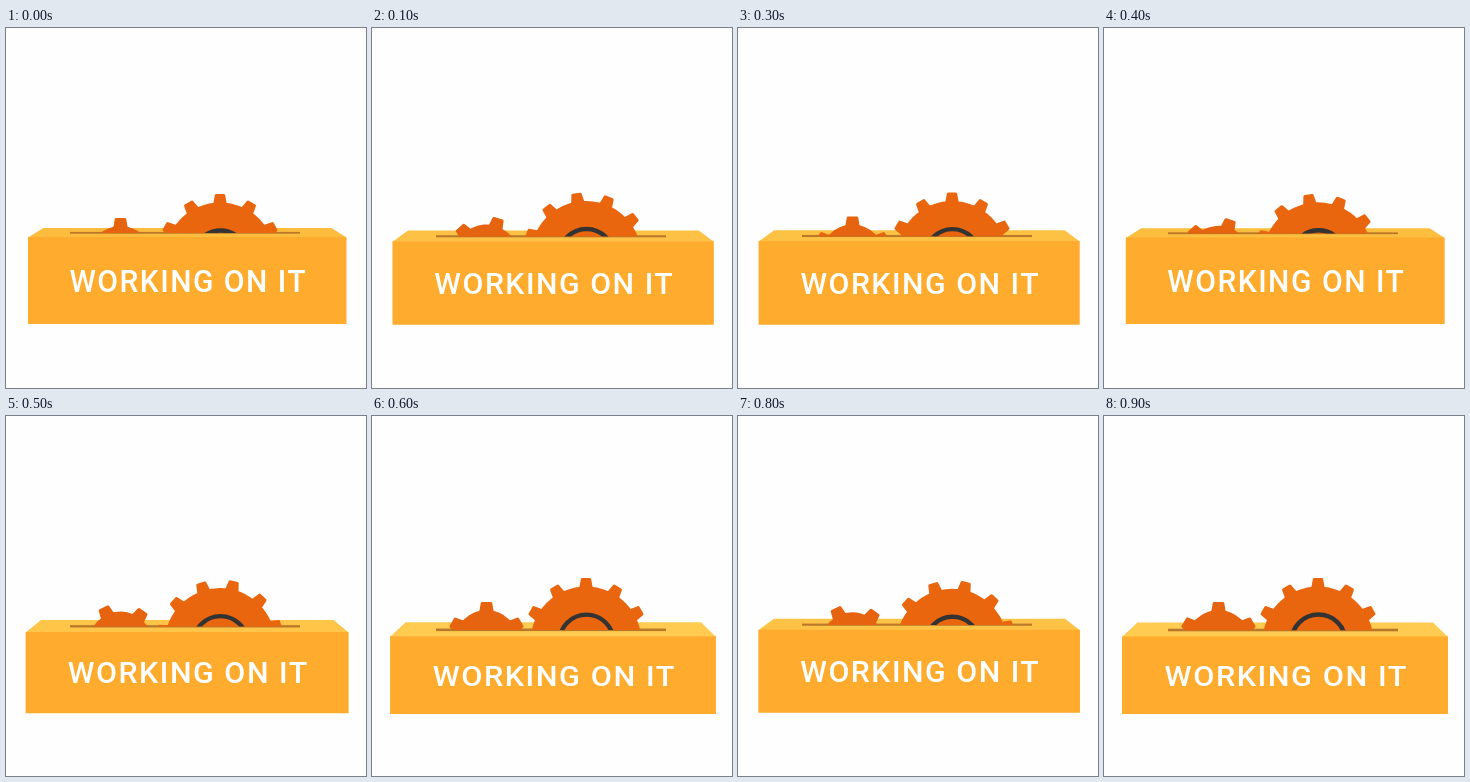
These frames come from a looping animation (360 px wide and 360 px high, 1000 ms). An HTML page with a canvas:

```html
<!DOCTYPE html>
<html lang="en">
<head>
<meta charset="utf-8">
<title>Working on it</title>
<style>
  html, body { margin: 0; width: 100%; height: 100%; overflow: hidden; background: #fefefe; }
  canvas { display: block; width: 360px; height: 360px; }
</style>
</head>
<body>
<canvas id="stage"></canvas>
<script>
const SIZE = 360, LOOP = 1000, STEP = 100;
const canvas = document.getElementById('stage');
const ctx = canvas.getContext('2d');
const ratio = window.devicePixelRatio || 1;
canvas.width = canvas.height = SIZE * ratio;

// How far the box is squashed at each step: 0 tall, 1 flat
const squash = [0, 0.38, 1, 0.35, 0.05, 0.6, 0.98, 0.1, 0.42, 1];

const mix = (a, b, k) => a + (b - a) * k;

function polygon(points, color) {
  ctx.beginPath();
  points.forEach(([x, y]) => ctx.lineTo(x, y));
  ctx.closePath();
  ctx.fillStyle = color;
  ctx.fill();
}

function gear(x, y, { teeth, body, tip, tipHalf, baseHalf, color }, angle) {
  const round = 1.5;
  ctx.save();
  ctx.translate(x, y);
  ctx.rotate(angle * Math.PI / 180);
  ctx.strokeStyle = color;
  ctx.lineWidth = round * 2;
  ctx.lineJoin = 'round';
  for (let i = 0; i < teeth; i++) {
    polygon([
      [-baseHalf + round, -body + 3],
      [-tipHalf + round, -tip + round],
      [tipHalf - round, -tip + round],
      [baseHalf - round, -body + 3]
    ], color);
    ctx.stroke();
    ctx.rotate(2 * Math.PI / teeth);
  }
  ctx.beginPath();
  ctx.arc(0, 0, body, 0, 2 * Math.PI);
  ctx.fill();
  ctx.restore();
}

const bigGear = { teeth: 12, body: 55.5, tip: 64, tipHalf: 5.2, baseHalf: 7, color: '#e9660f' };
const smallGear = { teeth: 6, body: 32, tip: 40, tipHalf: 5.8, baseHalf: 7.4, color: '#e6630f' };

function drawBox(k, slotY) {
  const left = mix(22, 18, k), right = mix(340.5, 344, k);
  const top = mix(209, 220.5, k), bottom = mix(296, 298, k);
  const back = mix(200, 206.5, k);
  const lid = `rgb(${mix(252, 255, k)}, ${mix(189, 203, k)}, ${mix(62, 80, k)})`;

  polygon([[left, top + 0.5], [left + 15.5, back], [right - 15, back], [right, top + 0.5]], lid);
  polygon([[left, top], [right, top], [right, bottom], [left, bottom]], '#ffab2d');

  const slot = mix(1.8, 2.6, k);
  ctx.fillStyle = '#b9782a';
  ctx.fillRect(64, slotY - slot / 2, 230, slot);

  const size = 30, spacing = 1.5;
  ctx.save();
  ctx.translate(181.5, (top + bottom) / 2 + 0.5);
  ctx.scale((right - left) / 318.5, (bottom - top) / 87 * 1.04);
  ctx.font = `500 ${size}px Roboto, sans-serif`;
  ctx.letterSpacing = spacing + 'px';
  ctx.textAlign = 'center';
  ctx.fillStyle = '#fff';
  ctx.fillText('WORKING ON IT', spacing / 2, size * 0.711 / 2);
  ctx.restore();
}

function drawGears(k, turn, slotY) {
  const y = mix(230, 226, k);
  ctx.save();
  ctx.beginPath();
  ctx.rect(0, 0, SIZE, slotY + 0.3);
  ctx.clip();
  gear(114.5, y, smallGear, 60 * turn);
  gear(214, y, bigGear, -30 * turn);
  ctx.beginPath();
  ctx.arc(214.5, y - 0.5, 27, 0, 2 * Math.PI);
  ctx.strokeStyle = '#333';
  ctx.lineWidth = 4.4;
  ctx.stroke();
  ctx.restore();
}

function draw(now) {
  const step = Math.floor((now % LOOP) / STEP);
  const k = squash[step];
  const turn = 0.29 * (step % 3);
  const slotY = mix(204.8, 214, k);

  ctx.setTransform(ratio, 0, 0, ratio, 0, 0);
  ctx.fillStyle = '#fefefe';
  ctx.fillRect(0, 0, SIZE, SIZE);
  drawBox(k, slotY);
  drawGears(k, turn, slotY);
}

const start = performance.now();
function tick() {
  draw(performance.now() - start);
  requestAnimationFrame(tick);
}
tick();
</script>
</body>
</html>
```
